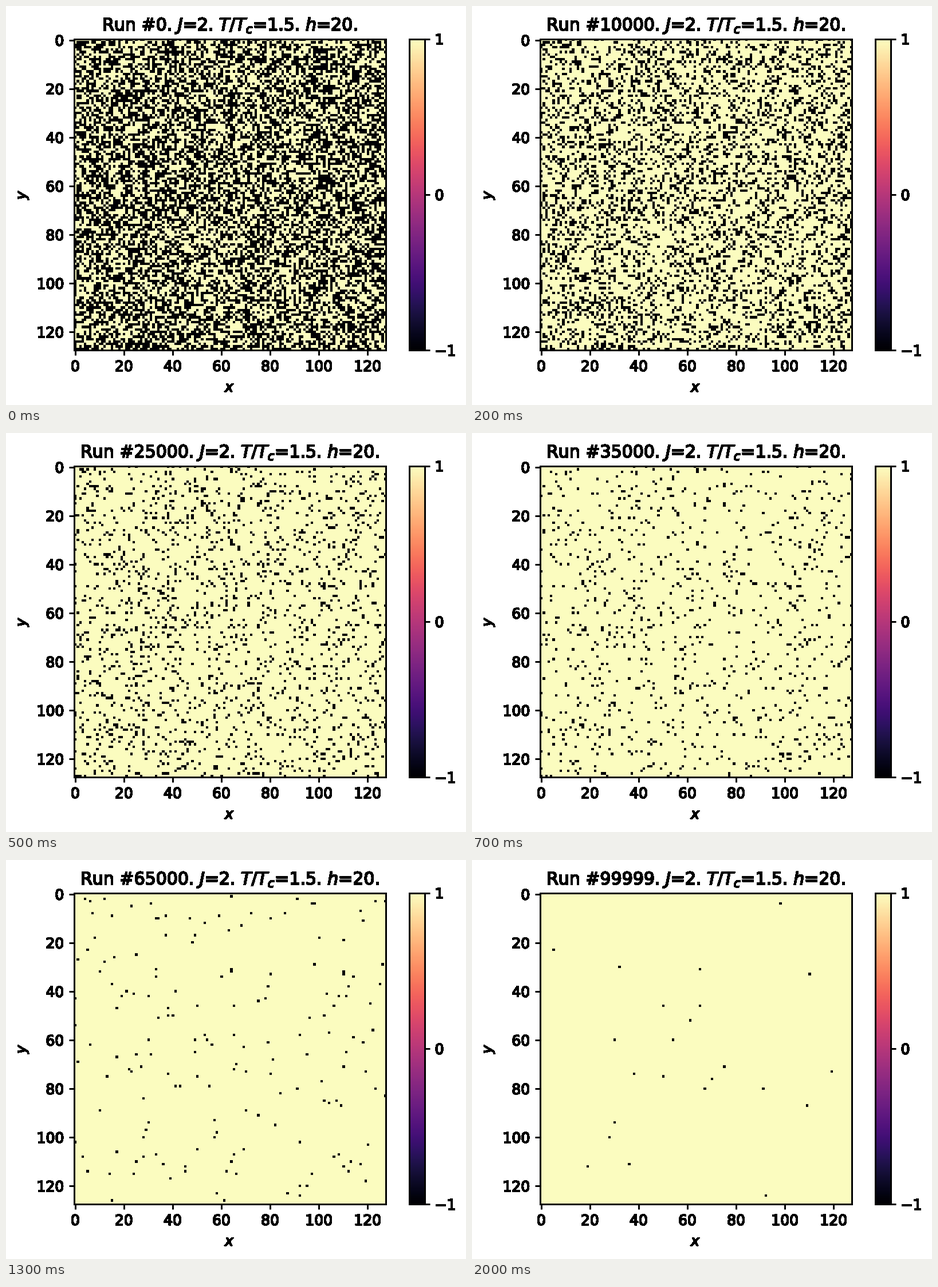
A matplotlib script for the animation above (2.1 s loop, 803 by 698 pixels).

```python
import numpy as np
import matplotlib.pyplot as plt
from matplotlib.animation import FuncAnimation
from matplotlib.patheffects import withStroke
from matplotlib.text import Text

W, H, DPI = 803, 698, 180
N = 128
FRAMES, STEP, LAST = 21, 5000, 99999

# Ising model: coupling, field and temperature (1.5 times critical)
J, FIELD = 2, 20
TEMP = 1.5 * 2 * J / np.log(1 + np.sqrt(2))


def simulate(seed=7):
    """Metropolis run from a random start; one snapshot per frame."""
    rng = np.random.default_rng(seed)
    s = rng.choice([-1, 1], (N, N)).tolist()
    sites = rng.integers(N, size=(LAST, 2)).tolist()
    limits = (-TEMP * np.log(1 - rng.random(LAST))).tolist()
    shots = []
    for n, ((r, c), limit) in enumerate(zip(sites, limits)):
        if n % STEP == 0:
            shots.append(np.array(s))
        near = s[r - 1][c] + s[(r + 1) % N][c] + s[r][c - 1] + s[r][(c + 1) % N]
        if 2 * s[r][c] * (J * near + FIELD) < limit:
            s[r][c] *= -1
    return shots + [np.array(s)]


def title(i):
    run = min(i * STEP, LAST)
    return f"Run #{run}. $J$=2. $T/T_c$=1.5. $h$=20."


def box(x, y, w, h):
    """Axes rectangle from pixels measured from the top left."""
    return [x / W, 1 - (y + h) / H, w / W, h / H]


plt.rcParams.update({
    "font.family": "DejaVu Sans",
    "text.antialiased": False,
    "axes.linewidth": 1.2,
    "xtick.major.width": 1.2,
    "ytick.major.width": 1.2,
    "axes.labelpad": 4.8,
})
fig = plt.figure(figsize=((W + 1e-9) / DPI, (H + 1e-9) / DPI), dpi=DPI)
ax = fig.add_axes(box(118.7, 57.7, 544.4, 544.4))
cax = fig.add_axes(box(703.9, 57.7, 27.2, 544.4))

shots = simulate()
im = ax.imshow(shots[0], cmap="magma", vmin=-1, vmax=1,
               interpolation="nearest", aspect="auto")
ax.set_xticks(range(0, N, 20))
ax.set_yticks(range(0, N, 20))
ax.set_xlabel("$x$")
ax.set_ylabel("$y$")
head = ax.set_title(title(0))
fig.colorbar(im, cax=cax, ticks=[-1, 0, 1])

# Hard-edged, slightly heavy lettering
fig.canvas.draw()
for label in fig.findobj(Text):
    label.set_path_effects([withStroke(linewidth=0.4, foreground="black")])


def update(i):
    im.set_data(shots[i])
    head.set_text(title(i))
    return im, head


anim = FuncAnimation(fig, update, frames=FRAMES, interval=100, repeat=True)
plt.show()
```
